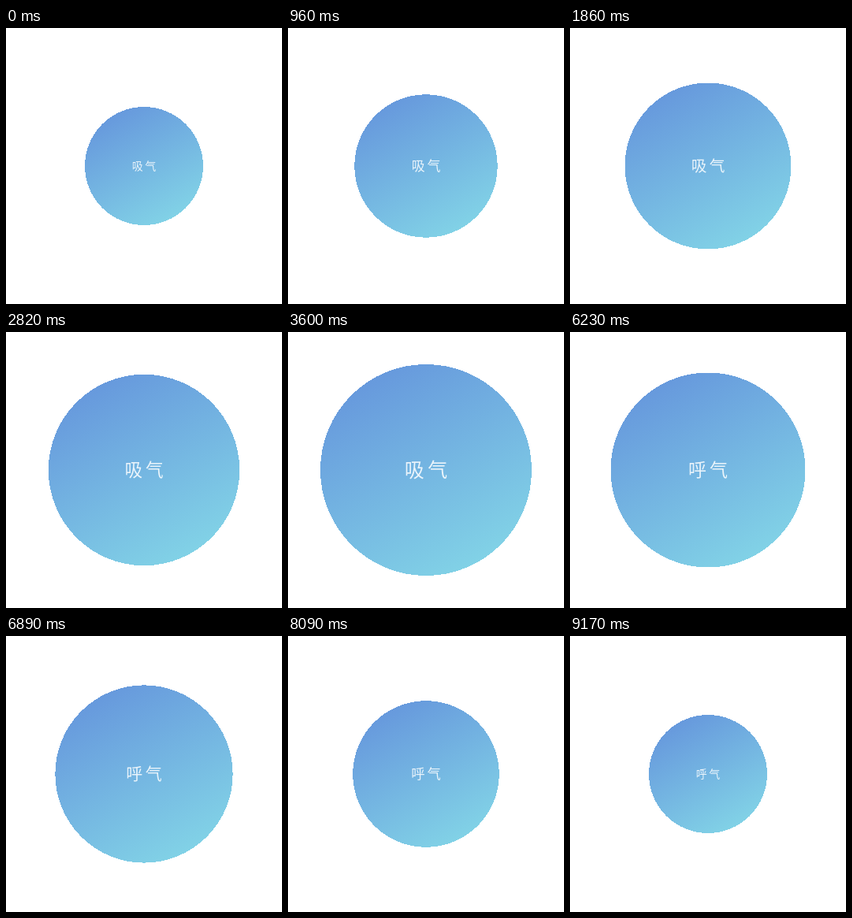
These frames come from a looping animation (350 px wide and 350 px high, 9.2 s). An HTML page:

```html
<!DOCTYPE html>
<html lang="zh">
<head>
<meta charset="utf-8">
<style>
html, body { margin: 0; width: 100%; height: 100%; overflow: hidden; background: #fff; }
svg { display: block; width: 100vw; height: 100vh; }
text {
  font: 300 14px KaiTi, "Noto Sans CJK SC", "Noto Sans CJK", sans-serif;
  text-anchor: middle;
  fill: #fff;
  fill-opacity: .85;
}
</style>
</head>
<body>
<svg viewBox="0 0 350 350">
  <defs>
    <linearGradient id="sky" x1=".16" y1="-.09" x2=".84" y2="1.09">
      <stop stop-color="#628fdb"/>
      <stop offset="1" stop-color="#86dce8"/>
    </linearGradient>
  </defs>
  <g id="ball">
    <circle r="75" fill="url(#sky)" shape-rendering="crispEdges"/>
    <text x="-8.2" y="4.8" id="verb">吸</text>
    <text x="8.2" y="4.8">气</text>
  </g>
</svg>
<script>
const LOOP = 9200, STEP = 30, BREATH = 3600, EXHALE = 5570;
const ball = document.getElementById('ball');
const verb = document.getElementById('verb');
const start = performance.now();

function radius(t) {
  if (t < EXHALE) return 75 + 59 * Math.min(t / BREATH, 1);
  return 75 + 59.4 * Math.max(1 - (t - EXHALE) / BREATH, 0);
}

function draw() {
  const time = (performance.now() - start) % LOOP;
  // The exhale steps are offset from the inhale steps by the held breath.
  const base = time < EXHALE ? 0 : EXHALE;
  const t = base + Math.floor((time - base) / STEP) * STEP;
  ball.setAttribute('transform', `translate(175 175) scale(${radius(t) / 75})`);
  verb.textContent = t < EXHALE ? '吸' : '呼';
  requestAnimationFrame(draw);
}
draw();
</script>
</body>
</html>
```
